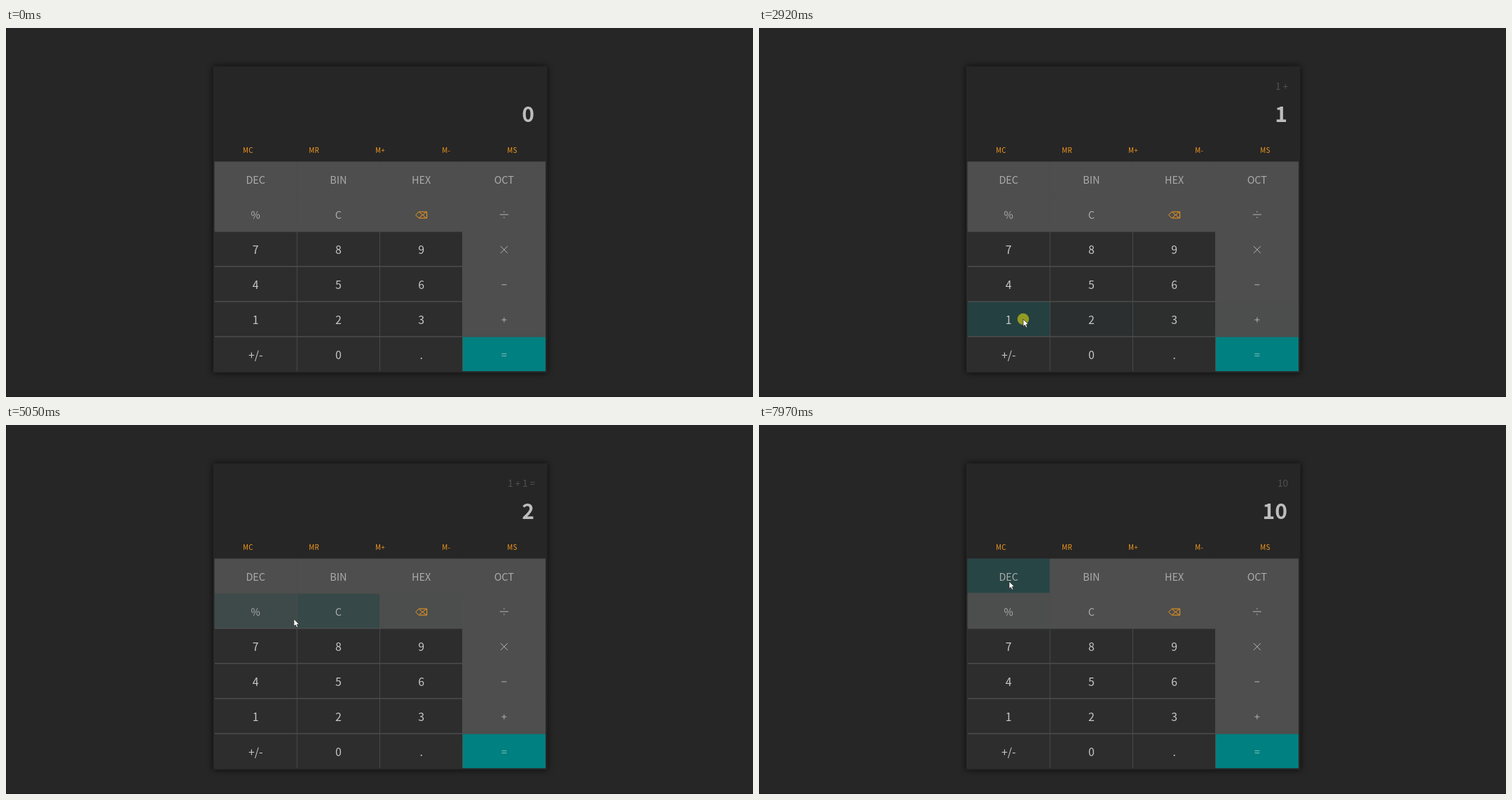
Recreate the animation shown at these times as an HTML page. Size 1066 by 526 pixels, loop 8000 ms.

```html
<!DOCTYPE html>
<html lang="en">
<head>
<meta charset="utf-8">
<title>Calculator</title>
<style>
  html, body { margin: 0; width: 100%; height: 100%; overflow: hidden; background: #262626; }
  svg { display: block; width: 100vw; height: 100vh; }
  text { font-family: "Noto Sans CJK SC", "Noto Sans CJK JP", "Noto Sans CJK", "Noto Sans", sans-serif; text-anchor: middle; }
  .panel { fill: #262626; filter: drop-shadow(0 0 4px rgba(0, 0, 0, .75)); }
  .digit { font-size: 15.8px; fill: #c8c8c8; }
  .op { font-size: 14.4px; font-weight: 300; fill: #acacac; }
  .mem { font-size: 9.8px; letter-spacing: .3px; fill: #f79a1c; }
  .sign { fill: none; stroke: #b4b4b4; stroke-width: 1; }
  .back { stroke: #f79a1c; }
  .equal { stroke: #7fbcbc; }
  #result { font-size: 30px; font-weight: 700; fill: #bdbdbd; text-anchor: end; }
  #formula { font-size: 13.5px; font-weight: 300; fill: #525252; text-anchor: end; }
</style>
</head>
<body>
<svg viewBox="0 0 1066 526" preserveAspectRatio="none">
  <rect width="1066" height="526" fill="#262626"/>
  <path d="M.5 0V525.5H1066" fill="none" stroke="#1d1d1d"/>
  <rect class="panel" x="295.5" y="54.5" width="477" height="437"/>
  <text id="formula" x="755" y="88"></text>
  <text id="result" x="754" y="134"></text>
  <g id="memory"></g>
  <rect x="297.6" y="190.6" width="472.3" height="298.6" fill="#4d4e4d"/>
  <g id="keys"></g>
  <circle id="click" r="8.3" fill="#929b20"/>
  <path id="cursor" d="M0 0V10.4L2.4 8.3L4 12L5.8 11.2L4.3 7.6H7.6Z" fill="#fff" stroke="#181818" stroke-width=".7"/>
</svg>
<script>
const LOOP = 8000;
const START = 176;
const STEP = 68.33;
const FADE = 0.37;
const HOVER = [36, 68, 68];
const KEY_HEIGHT = 48.6;
const byId = id => document.getElementById(id);

function add(parent, tag, attrs, text) {
  const el = document.createElementNS("http://www.w3.org/2000/svg", tag);
  for (const name in attrs) el.setAttribute(name, attrs[name]);
  if (text) el.textContent = text;
  return parent.appendChild(el);
}

// Signs are drawn around the centre of their key.
const signs = {
  "÷": "M-6 0H6M0 -5V-3.2M0 3.2V5",
  "×": "M-5 -5L5 5M-5 5L5 -5",
  "−": "M-3.5 0H3.5",
  "+": "M-3.5 0H3.5M0 -3.5V3.5",
  "=": "M-3.5 -1.5H3.5M-3.5 1.5H3.5",
  "⌫": "M-8 .5L-3.5 -4H8V5H-3.5ZM-2.5 -3L7 4.5M-2.5 4L7 -3.5"
};
const rows = ["DEC BIN HEX OCT", "% C ⌫ ÷", "7 8 9 ×", "4 5 6 −", "1 2 3 +", "+/- 0 . ="];

const keys = rows.flatMap((row, r) => row.split(" ").map((label, c) => {
  const x = 297.6 + 118.1 * c, y = 190.6 + 50 * r;
  const isDigit = r > 1 && c < 3;
  const base = label === "=" ? [0, 128, 128] : isDigit ? [45, 45, 45] : [77, 78, 77];
  const width = c === 3 ? 118 : 117.2;
  const rect = add(byId("keys"), "rect", { x, y, width, height: KEY_HEIGHT });
  const cx = 356.2 + 118.2 * c;
  if (signs[label]) {
    const kind = { "⌫": " back", "=": " equal" }[label] || "";
    add(byId("keys"), "path", { class: "sign" + kind, d: signs[label], transform: `translate(${cx} ${y + 25.4})` });
  } else {
    add(byId("keys"), "text", { class: isDigit ? "digit" : "op", x: cx, y: y + 30.9 }, label);
  }
  return { x, y, width, base, rect };
}));

["MC", "MR", "M+", "M-", "MS"].forEach((label, i) =>
  add(byId("memory"), "text", { class: "mem", x: 345.3 + 94.3 * i, y: 177.8 }, label));

// Pointer moves, timed in steps; lift arches the path upwards.
const entry = { x: 1011, y: 506 };
const moves = [
  { from: 0, to: 11, x: 397, y: 358, lift: 165 },
  { from: 11, to: 14, x: 397, y: 419 },
  { from: 23, to: 28, x: 690, y: 418 },
  { from: 30, to: 38, x: 377, y: 415, lift: -13 },
  { from: 40, to: 47, x: 693, y: 469 },
  { from: 57.4, to: 72, x: 407, y: 280, lift: 112 },
  { from: 73, to: 74, x: 424, y: 272 },
  { from: 81, to: 91, x: 430, y: 462 },
  { from: 91, to: 96, x: 393, y: 425 },
  { from: 100.5, to: 102, x: 457, y: 472 },
  { from: 105, to: 109, x: 357, y: 223 }
];
const presses = { 22: "1", 30: "+", 40: "1", 52: "=", 80: "C", 96: "1", 104: "0", 112: "DEC" };

function pointer(step) {
  let at = entry;
  for (const { from, to, x, y, lift = 0 } of moves) {
    if (step <= from) break;
    const f = Math.min(1, (step - from) / (to - from));
    const e = f * f * (3 - 2 * f);
    at = {
      x: at.x + (x - at.x) * e,
      y: at.y + (y - at.y) * e - lift * 4 * e * (1 - e)
    };
  }
  return at;
}

function press(state, key) {
  const { formula, result, fresh } = state;
  switch (key) {
    case "C": return { formula: "", result: "0", fresh: true };
    case "DEC": return { formula: result, result, fresh: true };
    case "+": return { formula: `${result} +`, result, fresh: true };
    case "=": return {
      formula: `${formula} ${result} =`,
      result: String(parseFloat(formula) + Number(result)),
      fresh: true
    };
    default: return { formula, result: fresh ? key : result + key, fresh: false };
  }
}

// Replays hovers and key presses up to the given step.
function replay(step) {
  const levels = keys.map(() => 0);
  let state = press({}, "C");
  for (let s = 0; s <= step; s++) {
    const { x, y } = pointer(s);
    keys.forEach((k, i) => {
      const over = x >= k.x && x < k.x + k.width && y >= k.y && y < k.y + KEY_HEIGHT;
      levels[i] += (over - levels[i]) * FADE;
    });
    if (presses[s] && s < step) state = press(state, presses[s]);
  }
  return { levels, state };
}

function draw(ms) {
  const step = Math.floor((ms - START) / STEP);
  const { x, y } = pointer(step);
  const { levels, state } = replay(step);
  const show = (id, on) => {
    byId(id).setAttribute("transform", `translate(${x} ${y})`);
    byId(id).setAttribute("visibility", on ? "visible" : "hidden");
  };
  show("cursor", step >= 0);
  show("click", step in presses);
  byId("formula").textContent = state.formula;
  byId("result").textContent = state.result;

  keys.forEach(({ base, rect }, i) => {
    const mix = base.map((v, j) => Math.round(v + (HOVER[j] - v) * levels[i]));
    rect.setAttribute("fill", `rgb(${mix})`);
  });
}

function tick() {
  draw(performance.now() % LOOP);
  requestAnimationFrame(tick);
}
tick();
</script>
</body>
</html>
```
